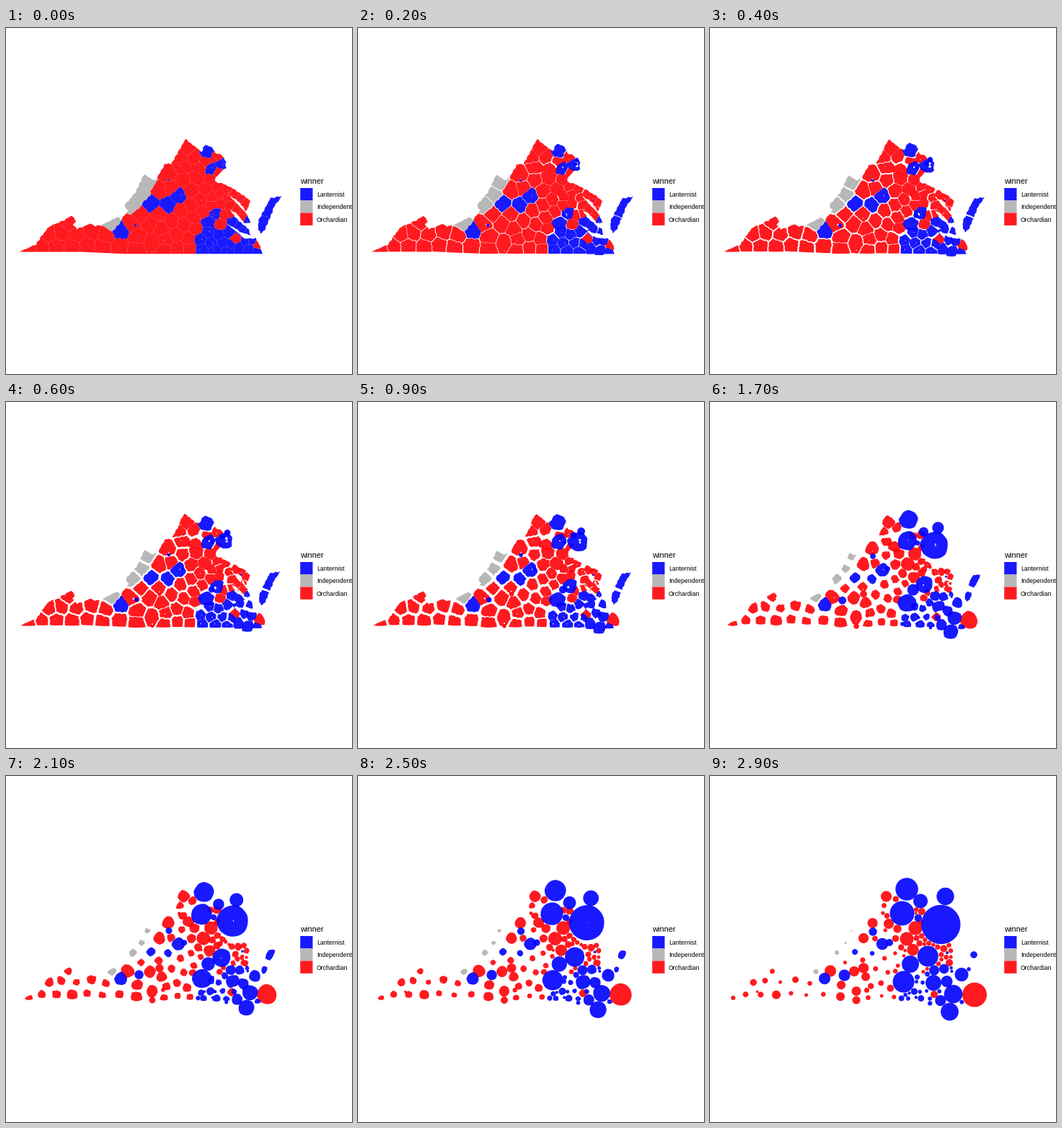
Animation of 480 by 480 pixels, one loop 3.3 s. Source, as a matplotlib script:

```python
import math

import matplotlib.pyplot as plt
import numpy as np
from matplotlib.animation import FuncAnimation
from matplotlib.collections import PathCollection
from matplotlib.patches import Rectangle
from matplotlib.path import Path

SIZE = 480
DPI = 80
FRAMES = 33
STEPS = 29
ALPHA = 0.9
RED, BLUE, GRAY = "#ff0107", "#0000ff", "#b0b0b0"
FILL_COUNTIES = 64
FILL_TOWNS = 16
rng = np.random.default_rng(8)

# Key points of the border, clockwise from the southeast corner
MAINLAND = [
    (356, 313.3), (165, 313.3), (104, 310.6), (18, 310.6), (42, 300), (47, 292),
    (60, 275), (80, 267), (92, 260), (97, 268), (93, 272), (99, 279), (118, 271),
    (124, 275), (133, 273), (155, 262), (159, 265), (170, 254), (164, 247),
    (180, 227), (191, 203), (207, 212), (221, 188), (229, 189), (249, 154),
    (271, 172), (276, 162), (287, 166), (290, 173), (299, 176), (305, 186),
    (305, 194), (291, 207), (290, 213), (304, 217), (320, 226), (339, 240),
    (334, 254), (322, 240), (310, 233), (320, 243), (333, 257), (340, 270),
    (331, 271), (318, 256), (310, 252), (322, 266), (336, 279), (339, 287),
    (327, 284), (306, 271), (319, 282), (331, 292), (347, 292), (351, 300),
]
SHORE = [(383, 233), (367, 236), (350, 268), (350, 279), (353, 285), (359, 280), (369, 256), (372, 247)]

# Main counties: x, y, final radius, then the final centre if it moves
COUNTIES = {
    RED: [
        (92, 303.5, 6), (174, 272, 8, 167, 270.5), (182, 290, 6), (181, 306, 6),
        (200, 271, 7), (216, 278.5, 6), (203, 298.5, 6.5), (225.5, 204, 7),
        (213, 225, 7), (252, 168, 7.5, 244.5, 167), (268, 195, 7, 248, 205),
        (265, 207, 5.7, 260, 212), (278, 224, 9.5, 273, 226), (285, 211, 9.7),
        (285.5, 246.5, 8.2, 281.5, 241), (318, 293, 5, 311, 303),
        (328, 263, 5, 332, 259), (350, 302, 17, 367, 303.5),
    ],
    GRAY: [(196, 214.5, 1), (188, 231.5, 1.6), (176, 245, 3), (147, 271.5, 3.4)],
    BLUE: [
        (159, 281, 8), (239, 233, 8.2), (225, 246, 3.2), (201, 244, 4),
        (279, 174, 15.7, 273, 157), (286, 195, 17, 266.5, 190.5),
        (297, 189, 27.2, 320.3, 206), (291, 257, 14.5, 302.3, 250),
        (281, 270, 15, 268.5, 285.5), (323, 304, 7.6, 319.8, 311.5),
        (337, 306, 12.4, 332.5, 327), (340, 294, 12.8, 337.5, 302.5),
        (333, 296, 8, 328.5, 285), (335, 284, 9.5, 349, 275.5),
        (328, 281, 11, 310, 287), (324, 273, 6.7, 324.7, 267.5),
        (315, 268, 7, 311, 269.5), (362, 247, 4.8, 366, 248), (353, 274, 2.8, 359, 268),
    ],
}
# Main towns, each inside a county
TOWNS = {
    RED: [(213, 266.5, 7.2), (203, 311, 5.5)],
    BLUE: [
        (179.6, 273.5, 8, 186.5, 276.5), (226, 211, 5.7, 226, 216),
        (243, 232, 5, 249, 231), (302, 185, 12.2, 326.5, 167),
        (302.5, 190, 10, 292, 173.5), (287, 260, 12, 278, 261),
        (286, 193.5, 5.2, 288.8, 197),
    ],
}


class Place:
    def __init__(self, color, x, y, r, *end, fixed=True):
        self.color, self.r, self.fixed = color, r, fixed
        self.seed = np.array([x, y], float)
        self.end = np.array(end or (x, y), float)
        self.first, self.last, self.codes = [], [], []

    def add_ring(self, a, b):
        self.first += [a, a[:1]]
        self.last += [b, b[:1]]
        self.codes += [Path.MOVETO] + [Path.LINETO] * (len(a) - 1) + [Path.CLOSEPOLY]

    def path(self, t):
        a, b = np.vstack(self.first), np.vstack(self.last)
        return Path(a + (b - a) * t, self.codes)


def distances(a, b):
    return np.hypot(*np.moveaxis(a[:, None] - b[None], -1, 0))


def fill_seeds(fixed, count):
    """Spread further seeds over the land, denser towards the east coast."""
    land = np.mgrid[10:370:2, 150:316:2].reshape(2, -1).T.astype(float)
    land = land[Path(MAINLAND).contains_points(land)]
    spacing = np.interp(land[:, 0], [190, 320], [20, 11])
    seeds = np.array(fixed)
    for _ in range(count):
        gap = distances(land, seeds).min(1) / spacing
        seeds = np.vstack([seeds, land[gap.argmax()]])
    for _ in range(4):
        owner = distances(land, seeds).argmin(1)
        for k in range(len(fixed), len(seeds)):
            seeds[k] = land[owner == k].mean(0)
    return seeds[len(fixed):]


def fill_color(x, y):
    southeast = x > 262 and y > 280 or x > 298 and y > 267
    return BLUE if southeast else RED


def push_apart(places):
    """Move the free circles until none overlap."""
    pos = np.array([p.end for p in places])
    r = np.array([p.r for p in places])
    fixed = np.array([p.fixed for p in places])
    share = np.where(fixed[None], 1, 0.5) * ~fixed[:, None]
    for _ in range(250):
        delta = pos[:, None] - pos[None]
        dist = np.hypot(delta[..., 0], delta[..., 1]) + 1e-6
        overlap = np.clip(r[:, None] + r[None] + 0.4 - dist, 0, None) * share
        pos += 0.5 * (delta * (overlap / dist)[..., None]).sum(1)
    for place, end in zip(places, pos):
        place.end = end


def disc(x, y, r, turns):
    a = 2 * math.pi * turns
    return np.column_stack([x + r * np.cos(a), y + r * np.sin(a)])


def clip(poly, normal, limit):
    """Keep the part of poly where p . normal < limit."""
    d = poly @ normal - limit
    out = []
    for i in range(len(poly)):
        if (d[i] < 0) != (d[i - 1] < 0):
            out.append(poly[i - 1] + (poly[i] - poly[i - 1]) * d[i - 1] / (d[i - 1] - d[i]))
        if d[i] < 0:
            out.append(poly[i])
    return np.array(out).reshape(-1, 2)


def densify(poly):
    out = []
    for a, b in zip(poly, np.roll(poly, -1, 0)):
        n = max(1, math.ceil(math.dist(a, b)))
        out += [a + (b - a) * k / n for k in range(n)]
    return np.array(out)


def wobble(p):
    """Roughen borders alike for neighbours, leaving the south edge straight."""
    x, y = p.T
    amp = 0.35 * np.clip((310 - y) / 6, 0, 1)
    dx = np.sin(0.9 * y + 0.3 * x) + np.sin(0.45 * x - 0.6 * y)
    dy = np.sin(0.8 * x + 0.4 * y) + np.sin(0.5 * y - 0.7 * x)
    return p + np.column_stack([amp * dx, amp * dy])


def cell(outline, seeds, i):
    """Part of the outline that lies nearest to seed i."""
    poly, s = np.array(outline, float), seeds[i]
    for j, o in enumerate(seeds):
        if j != i and math.dist(s, o) < 90 and len(poly):
            poly = clip(poly, o - s, (o @ o - s @ s) / 2)
    if len(poly) < 3:
        poly = disc(*s, 2, np.arange(12) / 12)
    x, y = poly.T
    if np.sum(x * np.roll(y, -1) - y * np.roll(x, -1)) < 0:
        poly = poly[::-1]
    return wobble(densify(poly))


def matching_disc(ring, x, y, r):
    """Circle points paired with the ring by length along its border."""
    step = np.hypot(*(np.roll(ring, -1, 0) - ring).T)
    turns = (np.cumsum(step) - step) / step.sum()
    dx, dy = (ring - ring.mean(0)).T
    phase = np.angle(np.mean(np.exp(1j * (np.arctan2(dy, dx) - 2 * math.pi * turns))))
    return disc(x, y, r, turns + phase / (2 * math.pi))


def build_places():
    counties = [Place(c, *item) for c, items in COUNTIES.items() for item in items]
    towns = [Place(c, *item) for c, items in TOWNS.items() for item in items]

    fill = [
        Place(fill_color(x, y), x, y, rng.uniform(2.2, 5), fixed=False)
        for x, y in fill_seeds([p.seed for p in counties], FILL_COUNTIES)
    ]
    counties += fill
    for k in rng.choice(len(fill), FILL_TOWNS, replace=False):
        x, y = fill[k].seed + rng.uniform(-3, 3, 2)
        color = BLUE if rng.random() < 0.3 else fill[k].color
        towns.append(Place(color, x, y, rng.uniform(1.8, 4), fixed=False))
    push_apart(counties + towns)

    on_shore = Path(SHORE).contains_points([p.seed for p in counties])
    for outline, side in ((MAINLAND, False), (SHORE, True)):
        group = [p for p, s in zip(counties, on_shore) if s == side]
        seeds = [p.seed for p in group]
        for i, p in enumerate(group):
            ring = cell(outline, seeds, i)
            p.add_ring(ring, matching_disc(ring, *p.end, p.r))

    # Each town leaves a closing hole in its county
    wave = np.arange(36) / 36
    for town in towns:
        ring = disc(*town.seed, 0.6 + 0.14 * town.r, wave)
        town.add_ring(ring, disc(*town.end, town.r, wave))
        home = min(counties, key=lambda p: math.dist(p.seed, town.seed))
        home.add_ring(ring[::-1], np.tile(home.end, (len(ring), 1)))

    order = [RED, GRAY, BLUE]
    return sorted(counties, key=lambda p: order.index(p.color)) + towns


def draw_legend(ax):
    def label(x, y, text, px):
        ax.text(x, y, text, family="Liberation Sans", fontsize=px * 72 / DPI, color="black")

    label(408, 216, "winner", 11)
    names = [("Lanternist", BLUE), ("Independent", GRAY), ("Orchardian", RED)]
    for k, (name, color) in enumerate(names):
        y = 222 + 17.28 * k
        ax.add_patch(Rectangle((408.2, y), 17.28, 17.28, fc=color, lw=0, alpha=ALPHA, snap=False))
        label(431, y + 12, name, 8.8)


fig = plt.figure(figsize=(SIZE / DPI, SIZE / DPI), dpi=DPI, facecolor="white")
ax = fig.add_axes([0, 0, 1, 1])
ax.set_xlim(0, SIZE)
ax.set_ylim(SIZE, 0)
ax.axis("off")

places = build_places()
shapes = PathCollection(
    [p.path(0) for p in places],
    facecolors=[p.color for p in places],
    edgecolors="none",
    linewidths=0,
    alpha=ALPHA,
    transform=ax.transData,
)
ax.add_collection(shapes, autolim=False)
draw_legend(ax)


def update(frame):
    t = min(frame, STEPS) / STEPS
    shapes.set_paths([p.path(t) for p in places])
    return (shapes,)


anim = FuncAnimation(fig, update, frames=FRAMES, interval=100, repeat=True, repeat_delay=0)
plt.show()
```
